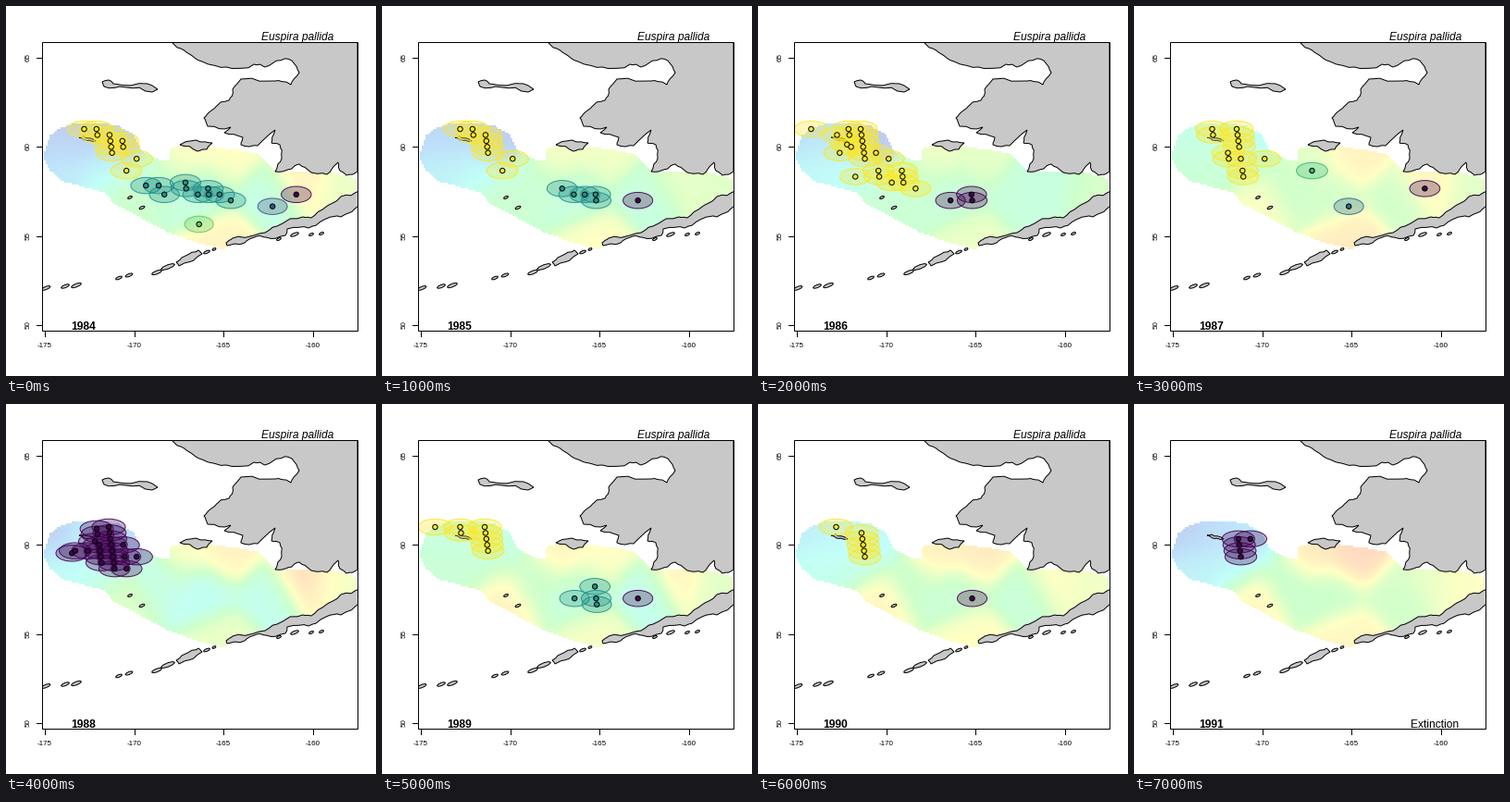
Recreate the animation shown at these times as a matplotlib script. Size 400 px wide and 400 px high, loop 8000 ms.

```python
import math
import numpy as np
import matplotlib.pyplot as plt
from matplotlib.animation import FuncAnimation
from matplotlib.colors import to_rgb
from matplotlib.patches import Ellipse, Polygon, Rectangle
from matplotlib.path import Path

SIZE, DPI = 400, 100
PX = 72 / DPI
DEG = 19.3  # pixels per degree
LEFT, TOP, RIGHT, BOTTOM = 39, 39, 380, 351
YEARS = range(1984, 1992)

# --- land -----------------------------------------------------------------
MAINLAND = [
    (380, 36), (174, 36), (184, 44), (195, 50), (212, 60), (238, 66),
    (268, 63), (280, 66), (301, 57), (309, 59), (317, 72), (308, 85),
    (291, 81), (254, 79), (245, 90), (241, 102), (232, 104), (222, 113),
    (214, 121), (218, 130), (243, 131), (236, 137), (256, 142), (254, 150),
    (272, 151), (291, 134), (287, 148), (296, 150), (298, 165), (291, 179),
    (309, 176), (317, 171), (330, 180), (347, 182), (359, 169), (361, 178),
    (368, 183), (380, 179),
]
PENINSULA = [
    (384, 199), (362, 206), (346, 217), (330, 229), (321, 228), (293, 238),
    (274, 246), (245, 251), (238, 256), (239, 259), (258, 256), (271, 249),
    (281, 250), (302, 248), (304, 241), (327, 240), (346, 230), (362, 228),
    (384, 214),
]
LAWRENCE = [
    (104, 82), (111, 80), (116, 84), (153, 84), (164, 90), (158, 93),
    (130, 88), (106, 87),
]
NUNIVAK = [(188, 150), (205, 145), (223, 148), (217, 155), (207, 157)]
UNALASKA = [
    (184, 277), (190, 272), (208, 264), (212, 268), (206, 272), (187, 281),
]
MATTHEW = [(79, 142), (84, 141), (97, 146), (85, 145)]
# centre and width of the small islands
ISLETS = [
    (134, 207, 5), (147, 218, 6), (163, 288, 11), (175, 282, 15),
    (217, 266, 7), (225, 263, 4), (133, 291, 8), (122, 294, 7), (64, 303, 9),
    (76, 302, 11), (43, 305, 10), (295, 252, 5), (312, 247, 9), (330, 247, 5),
    (341, 246, 5),
]


def islet(x, y, width):
    """A small lens tilted along the island arc."""
    a = np.linspace(0, 2 * np.pi, 8, endpoint=False)
    u, v = width / 2 * np.cos(a), (.8 + width / 10) * np.sin(a)
    return list(zip(x + u, y + v - .35 * u))


def roughen(points, seed, depth=2):
    """Split long coast segments at seeded, slightly shifted midpoints."""
    rng = np.random.default_rng(seed)
    for _ in range(depth):
        out = []
        for a, b in zip(points, points[1:] + points[:1]):
            out.append(a)
            gap = math.dist(a, b)
            if 4 < gap < 40:
                dx, dy = rng.uniform(-.11, .11, 2) * gap
                out.append(((a[0] + b[0]) / 2 + dx, (a[1] + b[1]) / 2 + dy))
        points = out
    return points


# --- sea temperature over the shelf ----------------------------------------
SHELF = [
    (40, 163), (48, 140), (57, 133), (72, 128), (100, 126), (122, 130),
    (137, 138), (146, 156), (169, 168), (177, 166), (176, 155), (200, 149),
    (252, 156), (272, 160), (293, 180), (350, 179), (379, 187), (380, 200),
    (330, 230), (241, 258), (236, 263), (204, 255), (174, 244), (116, 213),
    (108, 202), (60, 189), (48, 178),
]
NODES = np.array([
    (50, 143), (90, 142), (130, 143), (60, 173), (105, 175), (130, 210),
    (165, 190), (190, 160), (240, 163), (215, 203), (235, 253), (285, 205),
    (320, 184), (360, 192),
])
RAMP = np.array([to_rgb(c) for c in (
    "#bec4e8", "#bedefa", "#c2fff8", "#ceffcc", "#ffffc4", "#ffe6c0",
    "#ffd0c4")])  # cold to warm
TEMPS = {
    1984: [.5, .4, .6, 1.4, 1.9, 3, 2.7, 4, 4, 2.4, 4.4, 2.4, 4.6, 3.6],
    1986: [1, 1.3, .2, 1.9, 2, 2.8, 2.8, 3.7, 3.5, 2.6, 3.6, 2.6, 2.5, 3.2],
    1987: [2.3, 2.4, 2, 2.8, 2.7, 4, 3, 3.5, 4.5, 3.1, 4.7, 3.1, 4.5, 3.4],
    1988: [.4, 1.6, .9, 2, 2.2, 3.4, 2.3, 4, 4.5, 2, 3.6, 2.2, 5.3, 3.8],
    1989: [2.5, 2.6, 2.4, 2.8, 2.7, 4.5, 2.8, 4.4, 4, 2.6, 3.8, 2.2, 4.5, 3.4],
    1991: [.4, 1, 1.4, 1.7, 1.8, 4.4, 2.7, 4.9, 5.5, 2.9, 4.3, 3.1, 3.6, 4],
}
for y in YEARS:
    if y not in TEMPS:
        TEMPS[y] = (np.array(TEMPS[y - 1]) + TEMPS[y + 1]) / 2

CELL = 2
xs = np.arange(40, 380, CELL)
ys = np.arange(126, 266, CELL)
gx, gy = np.meshgrid(xs, ys)
cells = np.column_stack([gx.ravel(), gy.ravel()])
inside = Path(SHELF).contains_points(cells).reshape(gx.shape)
dist2 = ((cells[:, None] - NODES) ** 2).sum(axis=2)
weights = np.exp(-dist2 / (2 * 18 ** 2)) + 1e-9
weights /= weights.sum(axis=1, keepdims=True)


def shelf_image(year):
    temp = (weights @ TEMPS[year]).reshape(gx.shape)
    rgb = [np.interp(temp, range(len(RAMP)), shade) for shade in RAMP.T]
    return np.dstack(rgb + [inside.astype(float)])


# --- sightings: clusters of survey grid columns with their rows -------------
SIGHTINGS = {
    1984: [{18.5: [11]}, {16: [13]},
           {4.5: [9.5], 5.6: [9.5], 6: [11], 8: [9, 10], 9: [11],
            10: [10, 11], 11: [11], 12: [12]},
           {8.8: [16]},
           {0: [0], 1: [0, 1], 2: range(1, 5), 3: [2, 3, 7], 4: [5]}],
    1985: [{15: [12]}, {8: [10], 9: [11], 10: [11], 11: [11, 12]},
           {0: [0], 1: [0, 1], 2: range(1, 5), 3: [7], 4: [5]}],
    1986: [{9: [12], 11: [11, 12]},
           {-2: [0], 0: [1, 4], .7: [2.6], 1: [0, 1, 3, 8], 2: range(6),
            3: [4, 7, 8], 4: [5, 9], 5: [7, 8, 9], 6: [10]}],
    1987: [{18.6: [10]}, {11: [13]}, {8: [7]},
           {0: [0, 1], 1: [4, 5], 2: [0, 1, 2, 3, 5, 7, 8], 4: [5]}],
    1988: [{-1.3: [4.4], -1: [4], 0: [4], .7: [2.4],
            1: [.3, 1.2, 3, 4, 5, 6], 2: range(8), 3: [3, 5, 7], 4: [5]}],
    1989: [{15: [12]}, {9: [12], 11: [10, 12, 13]},
           {-2: [0], 0: [0, 1], 2: range(5)}],
    1990: [{11: [12]}, {0: [0], 2: range(1, 6)}],
    1991: [{2: range(2, 6), 3: [2]}],
}


def station(col, row):
    x = 84.5 + 13.4 * col - .07 * col ** 2 + (.95 - .025 * col) * row
    return x, 133 + DEG / 3 * row


# --- fixed parts -----------------------------------------------------------
plt.rcParams["font.family"] = "Liberation Sans"
plt.rcParams["axes.unicode_minus"] = False
fig = plt.figure(figsize=(SIZE / DPI, SIZE / DPI), dpi=DPI, facecolor="white")
ax = fig.add_axes([0, 0, 1, 1])
ax.axis("off")

field = ax.imshow(shelf_image(YEARS[0]), interpolation="nearest",
                  aspect="auto", zorder=1,
                  extent=(xs[0] - 1, xs[-1] + 1, ys[-1] + 1, ys[0] - 1))
ax.set_xlim(0, SIZE)
ax.set_ylim(SIZE, 0)

frame = Rectangle((LEFT, TOP), RIGHT - LEFT, BOTTOM - TOP, fill=False,
                  ec="black", lw=PX, zorder=6)
ax.add_patch(frame)

coasts = [MAINLAND, PENINSULA, LAWRENCE, NUNIVAK, UNALASKA, MATTHEW]
coasts = [roughen(c, i) for i, c in enumerate(coasts)]
coasts += [islet(*spot) for spot in ISLETS]
for coast in coasts:
    land = Polygon(coast, fc="#c8c8c8", ec="black", lw=PX, zorder=2)
    ax.add_patch(land)
    land.set_clip_path(frame)


def line(x, y):
    ax.plot(x, y, color="black", lw=PX, zorder=6)


def label(x, y, text, px, va="baseline", **style):
    return ax.text(x, y, text, fontsize=px * PX, va=va, zorder=7, **style)


for n in range(4):
    x = 42 + 5 * n * DEG
    line([x, x], [BOTTOM, BOTTOM + 6])
    label(x, 369, str(5 * n - 175), 8, ha="center")
    y = 345 - 5 * n * DEG
    line([LEFT - 6, LEFT], [y, y])
    label(24, y, str(50 + 5 * n), 8, va="center", ha="center", rotation=90)

label(354, 37, "Euspira pallida", 12, ha="right", style="italic")
year_text = label(70.5, 350, "", 12, ha="left", weight="bold")
note = label(351, 350, "", 12, ha="right")

# --- animation -------------------------------------------------------------
marks = []


def add(x, y, w, h, **style):
    marks.append(ax.add_patch(Ellipse((x, y), w, h, lw=PX, **style)))


def draw(i):
    while marks:
        marks.pop().remove()
    year = YEARS[i]
    field.set_data(shelf_image(year))
    clusters = SIGHTINGS[year]
    shades = plt.get_cmap("viridis")(np.linspace(0, 1, len(clusters)))[:, :3]
    for shade, cluster in zip(shades, clusters):
        for col, rows in cluster.items():
            for row in rows:
                x, y = station(col, row)
                # a fixed radius widens with latitude on this grid
                lat = 61 - row / 3
                h = 17.5
                w = h / math.cos(math.radians(lat))
                add(x, y, w, h, fc=(*shade, .3), ec=(*shade, .9), zorder=4)
                add(x, y, 5.4, 5.4, fc=shade, ec="black", zorder=5)
    year_text.set_text(str(year))
    note.set_text("Extinction" if year == YEARS[-1] else "")
    return marks


anim = FuncAnimation(fig, draw, frames=len(YEARS), interval=1000, repeat=True,
                     repeat_delay=0, init_func=lambda: draw(0), blit=False)
plt.show()
```
